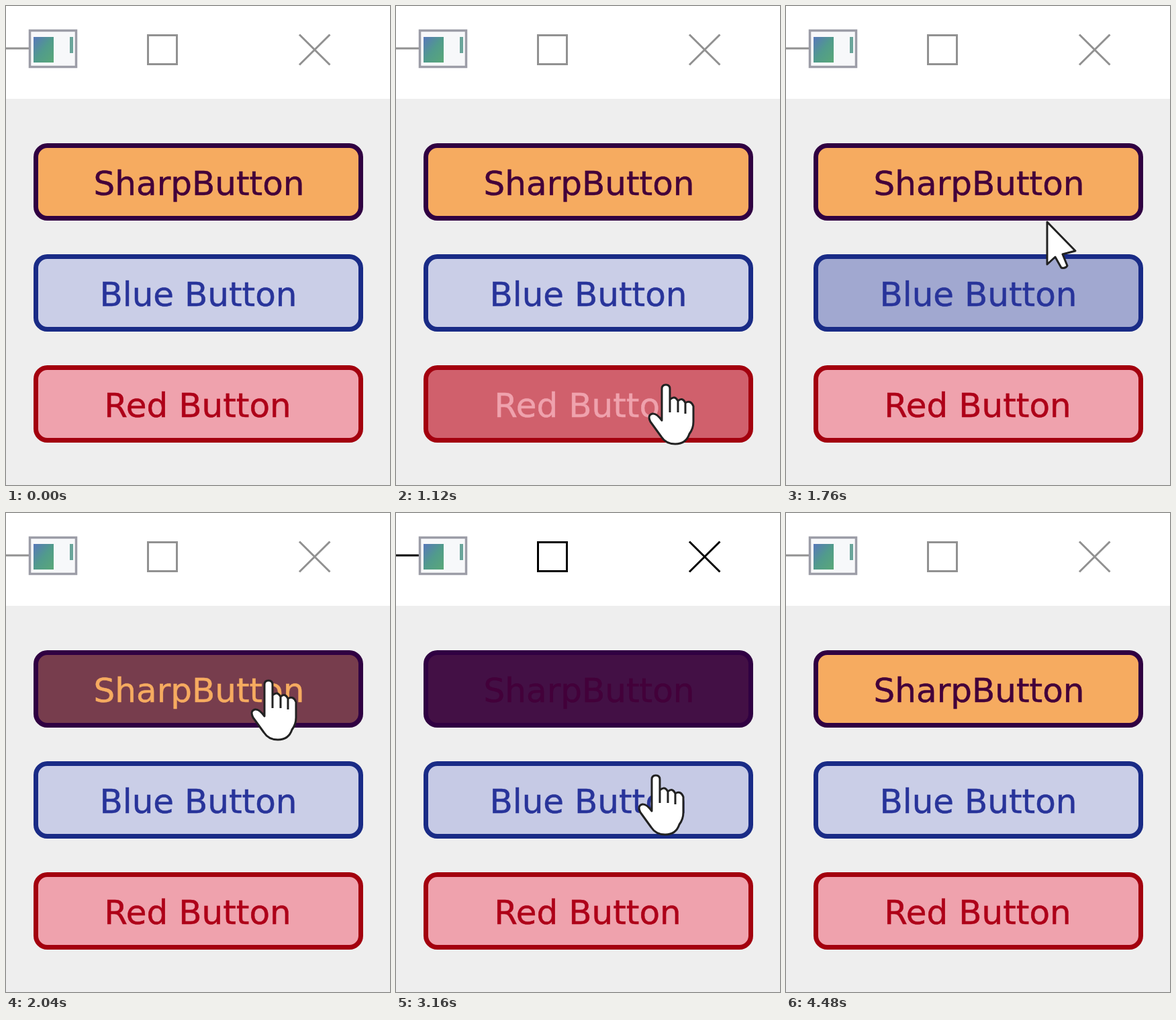
Recreate the animation shown at these times as an HTML page. Size 572x712 px, loop 4520 ms.

```html
<!DOCTYPE html>
<html lang="en">
<head>
<meta charset="utf-8">
<title>Animated buttons</title>
<style>
  html, body { margin: 0; width: 100%; height: 100%; overflow: hidden; background: #eee; }
  svg { display: block; width: 572px; height: 712px; }
  text { font: 50px "DejaVu Sans", Verdana, sans-serif; text-anchor: middle;
    fill: currentColor; stroke: currentColor; stroke-width: .5; }
  #cursor path { fill: #fff; stroke: #222; stroke-width: 3; stroke-linejoin: round; }
</style>
</head>
<body>
<svg viewBox="0 0 572 712">
  <defs>
    <linearGradient id="pane" x2="1" y2="1">
      <stop stop-color="#5878bb"/><stop offset=".5" stop-color="#519b8c"/><stop offset="1" stop-color="#5aa878"/>
    </linearGradient>
  </defs>
  <rect width="572" height="712" fill="#eee"/>
  <rect width="572" height="138" fill="#fff"/>
  <path id="controls" d="M0 63H34M211.5 43.5H254.5V86.5H211.5ZM437 42.5L482.5 87.5M482.5 42.5L437 87.5" fill="none" stroke-width="3"/>
  <rect x="35.5" y="36.5" width="69" height="54" fill="#f7f8fa" stroke="#9c9da7" stroke-width="3.5"/>
  <rect x="41" y="46" width="30" height="38" fill="url(#pane)"/>
  <rect x="95" y="46" width="5" height="24" fill="#6aa59a"/>
  <g id="buttons"></g>
  <g id="cursor">
    <path id="arrow" d="M1 1V64L13 53L22 69Q28 71 31 66L24 49L43 44Z"/>
    <path id="hand" d="M-6 7Q-6 1 0 1Q6 1 6 7V23Q13 16 18 25Q25 19 29 28Q37 23 41 33V56Q41 66 35 74Q30 89 14 89Q0 89-7 78L-23 56Q-28 46-20 44Q-14 43-6 54ZM6 22V42M18 25V42M29 28V44"/>
  </g>
</svg>
<script>
const LOOP = 4520, STEP = 40, FADE = 428, TICK = 5;
const $ = id => document.getElementById(id);

const buttons = [
  { label: "SharpButton", base: [246, 171, 96], dark: [48, 0, 66], ink: "#43003a" },
  { label: "Blue Button", base: [202, 206, 231], dark: [25, 43, 134], ink: "#28349a" },
  { label: "Red Button", base: [239, 162, 173], dark: [163, 0, 14], ink: "#ae0018" }
];
const topOf = i => 204 + 165 * i;

// cursor stops: time, x, y
const stops = [
  [40, 425, 150], [840, 408, 700], [1120, 402, 562], [1700, 388, 320], [1760, 388, 320],
  [2040, 391, 248], [3070, 391, 248], [3160, 387, 389], [3320, 385, 715]
];

const within = (t, a, b) => t >= a && t < b;
const mix = (a, b, k) => `rgb(${a.map((v, i) => Math.round(v + (b[i] - v) * k))})`;

function add(name, attrs) {
  const el = document.createElementNS("http://www.w3.org/2000/svg", name);
  for (const k in attrs) el.setAttribute(k, attrs[k]);
  return $("buttons").appendChild(el);
}

buttons.forEach((b, i) => {
  const y = topOf(i);
  b.box = add("rect", { x: 44.5, y: y + 3.5, width: 484, height: 108, rx: 17, "stroke-width": 7 });
  b.text = add("text", { x: 287.5 - i, y: y + 76.5 });
  b.text.textContent = b.label;
});

function cursorAt(t) {
  const i = stops.findIndex(s => s[0] > t);
  if (i < 1) return null;
  const a = stops[i - 1], b = stops[i], k = (t - a[0]) / (b[0] - a[0]);
  return [1, 2].map(j => a[j] + (b[j] - a[j]) * k);
}

function hovered(t) {
  const p = cursorAt(t);
  return p ? buttons.findIndex((b, i) => within(p[1], topOf(i), topOf(i) + 115)) : -1;
}

// each fill darkens while hovered and fades back afterwards
function levels(t) {
  const fill = buttons.map(() => 0);
  for (let s = 0; s < t; s += TICK) {
    const over = hovered(s);
    fill.forEach((v, i) => {
      fill[i] = Math.min(1, Math.max(0, v + (i === over ? TICK : -TICK) / FADE));
    });
  }
  return fill;
}

function draw(t) {
  const fill = levels(t), lit = hovered(t - STEP), p = cursorAt(t);
  $("controls").setAttribute("stroke", within(t, 2400, 4320) ? "#000" : "#919191");
  buttons.forEach((b, i) => {
    const pressed = i === 0 && within(t, 2400, 2600);
    b.box.setAttribute("fill", mix(b.base, b.dark, fill[i]));
    b.box.setAttribute("stroke", pressed ? "#eee" : mix(b.dark, b.dark, 0));
    b.text.style.color = i === lit ? mix(b.base, b.base, 0) : b.ink;
  });
  $("cursor").style.display = p ? "" : "none";
  if (!p) return;
  const hand = hovered(t) >= 0;
  $("hand").style.display = hand ? "" : "none";
  $("arrow").style.display = hand ? "none" : "";
  $("cursor").setAttribute("transform", `translate(${p})`);
}

const start = performance.now();
function frame() {
  const t = (performance.now() - start) % LOOP;
  draw(Math.floor(t / STEP) * STEP);
  requestAnimationFrame(frame);
}
frame();
</script>
</body>
</html>
```
